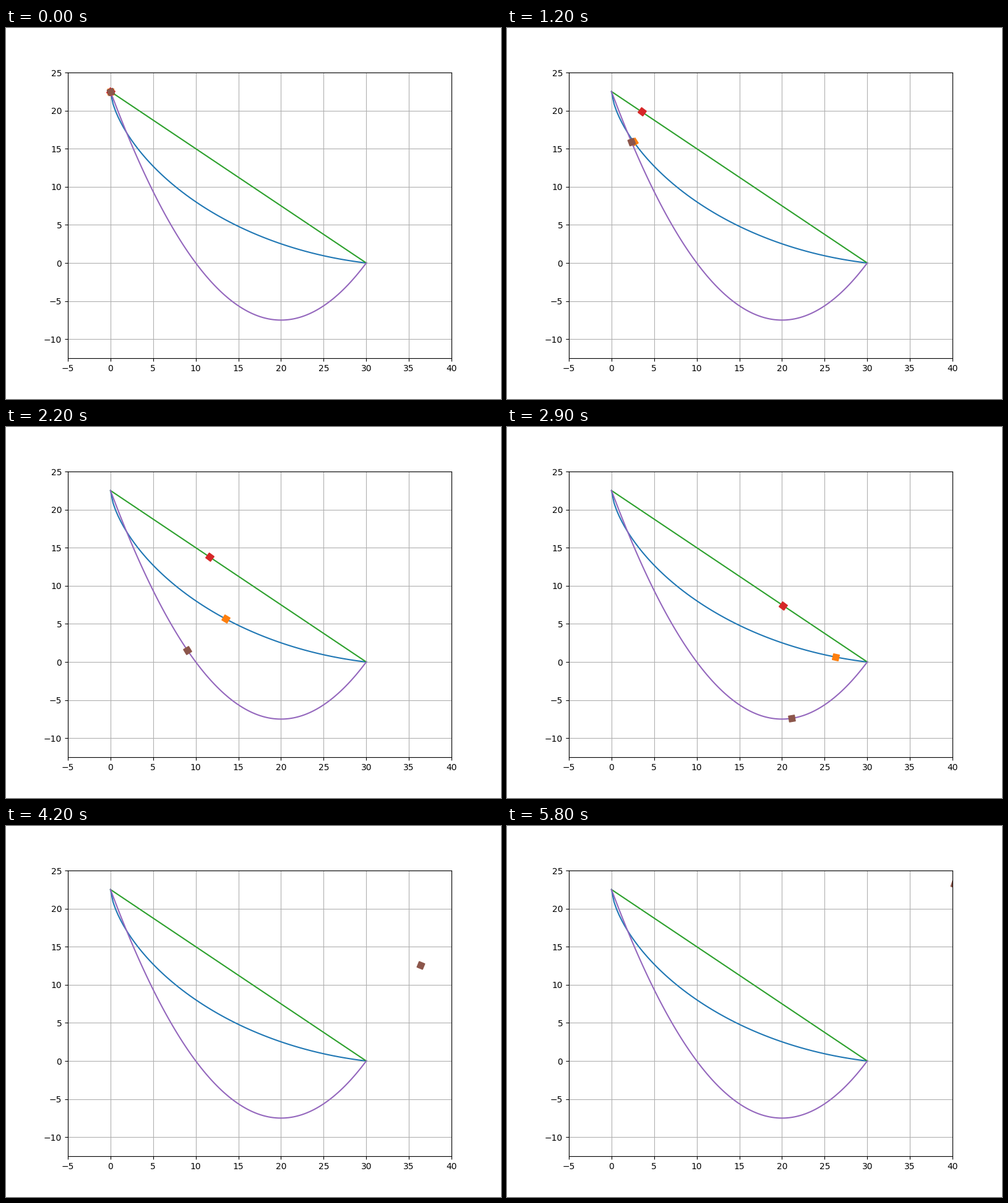
Animation, 800 px wide and 600 px high, one loop 7000 ms. Source, as a matplotlib script:

```python
import numpy as np
import matplotlib.pyplot as plt
from matplotlib.animation import FuncAnimation

G = 9.81
X_END, HEIGHT = 30.0, 22.5
DT = 1 / 60
STEPS_PER_FRAME = 6
LEAD_STEPS = 2
FRAMES, LAST_MOVING, INTERVAL = 70, 58, 100


def cycloid(theta, r):
    return r * (theta - np.sin(theta)), HEIGHT - r * (1 - np.cos(theta))


def cycloid_radius():
    """Radius of the cycloid that passes through (X_END, 0)."""
    lo, hi = 0.5, 6.0
    for _ in range(60):
        mid = (lo + hi) / 2
        if (mid - np.sin(mid)) / (1 - np.cos(mid)) < X_END / HEIGHT:
            lo = mid
        else:
            hi = mid
    return HEIGHT / (1 - np.cos(lo))


class Track:
    """A curve tabulated by arc length, with a block sliding down it."""

    def __init__(self, x, y):
        self.x, self.y = x, y
        dx, dy = np.diff(x), np.diff(y)
        self.s = np.concatenate([[0], np.cumsum(np.hypot(dx, dy))])
        self.s_mid = (self.s[1:] + self.s[:-1]) / 2
        self.slope = np.unwrap(np.arctan2(dy, dx))
        self.path = self.slide()

    def angle(self, s):
        return np.interp(s, self.s_mid, self.slope)

    def slide(self):
        s, v, path = 0.0, 0.0, []
        for _ in range(STEPS_PER_FRAME * LAST_MOVING + LEAD_STEPS + 1):
            path.append(s)
            accel = -G * np.sin(self.angle(s))
            s, v = s + v * DT, v + accel * DT
        return path

    def state(self, frame):
        step = STEPS_PER_FRAME * frame + (LEAD_STEPS if frame else 0)
        s = self.path[step]
        return (np.interp(s, self.s, self.x), np.interp(s, self.s, self.y),
                np.degrees(self.angle(s)))


line_x = np.linspace(0, 120, 4001)
bowl_x = np.linspace(0, 45, 8001)
tracks = [
    Track(*cycloid(np.linspace(0, 6.2, 8001), cycloid_radius())),
    Track(line_x, HEIGHT * (1 - line_x / X_END)),
    Track(bowl_x, 0.075 * (bowl_x - 20) ** 2 - 7.5),
]

fig, ax = plt.subplots(figsize=(8, 6), dpi=100)
ax.set_xlim(-5, 40)
ax.set_ylim(-12.5, 25)
ax.grid(True)

xs = np.linspace(0, X_END, 100)
blocks = []
for track in tracks:
    ax.plot(xs, np.interp(xs, track.x, track.y))
    blocks += ax.plot([0], [HEIGHT], linestyle="none", marker="s", markersize=10)


def update(i):
    frame = min(i, LAST_MOVING)
    for track, block in zip(tracks, blocks):
        x, y, angle = track.state(frame)
        block.set_data([x], [y])
        block.set_marker((4, 0, 45 + angle))
    return blocks


anim = FuncAnimation(fig, update, frames=FRAMES, interval=INTERVAL,
                     repeat=True, repeat_delay=0, blit=False)
plt.show()
```
